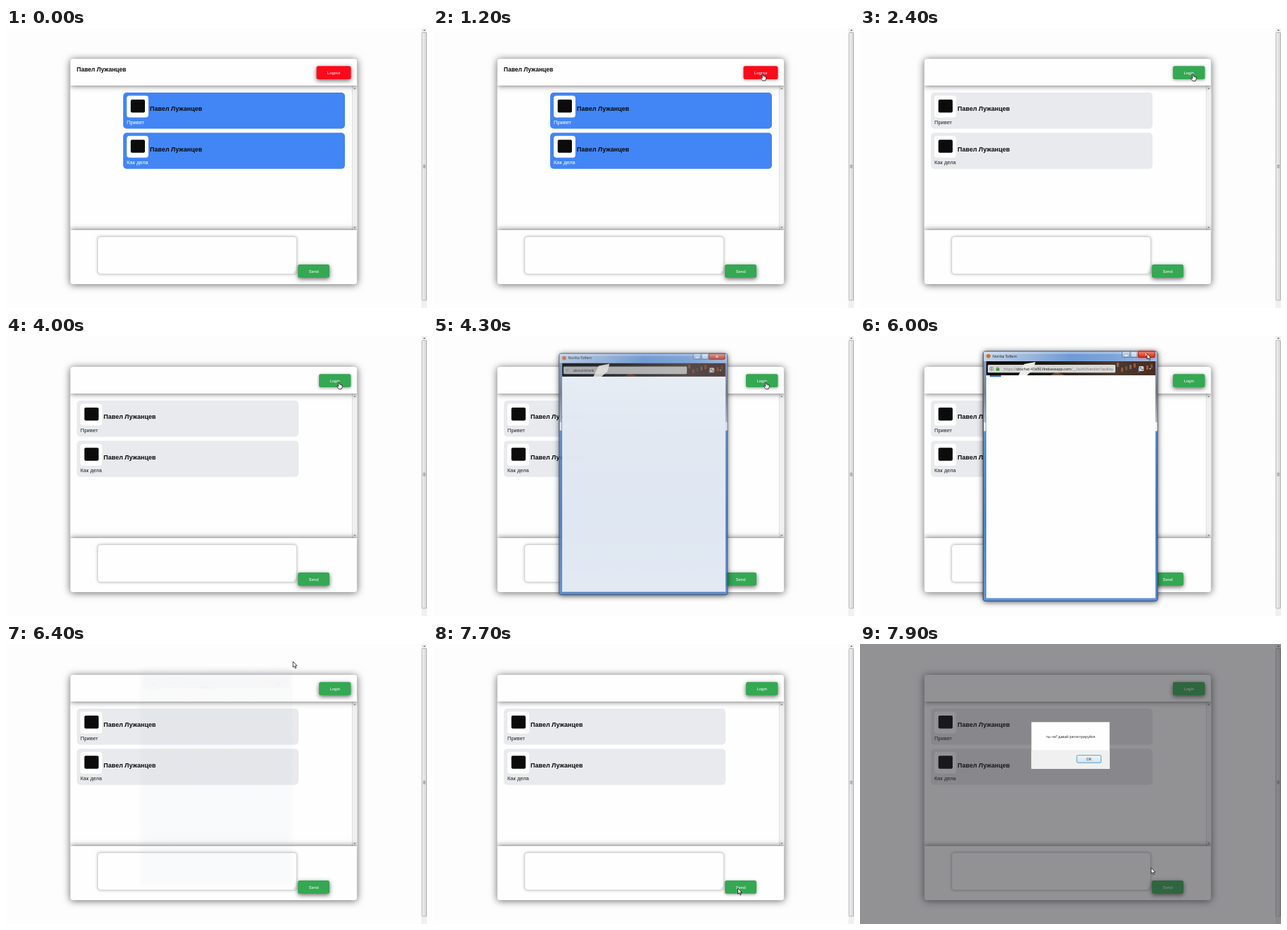
An HTML page with a canvas that plays this animation: 600x399 px, repeating every 8 s.

```html
<!DOCTYPE html>
<html lang="ru">
<head>
<meta charset="utf-8">
<title>Chat</title>
<style>
html, body { margin: 0; width: 100%; height: 100%; overflow: hidden; background: #fdfdfe; }
canvas { display: block; width: 600px; height: 399px; }
</style>
</head>
<body>
<canvas id="stage"></canvas>
<script>
const LOOP = 8000;
const USER = 'Павел Лужанцев';
const ARIAL = '"Liberation Sans", Arial, sans-serif';
const UI = '"Open Sans", "Noto Sans", sans-serif';
const GREEN = '#34a853';

const canvas = document.getElementById('stage');
const ctx = canvas.getContext('2d');
const dpr = window.devicePixelRatio || 1;
canvas.width = 600 * dpr;
canvas.height = 399 * dpr;

const clamp = v => Math.max(0, Math.min(1, v));
const span = (t, a, b) => clamp((t - a) / (b - a));
const smooth = p => p * p * (3 - 2 * p);
const easeOut = p => 1 - (1 - p) * (1 - p);

function rect(x, y, w, h, fill) {
  ctx.fillStyle = fill;
  ctx.fillRect(x, y, w, h);
}

// Rounded box with optional shadow [blur, dy, colour]
function box(x, y, w, h, r, fill, shadow, stroke) {
  ctx.save();
  ctx.beginPath();
  ctx.roundRect(x, y, w, h, r);
  if (shadow) {
    ctx.shadowBlur = shadow[0] * dpr;
    ctx.shadowOffsetY = shadow[1] * dpr;
    ctx.shadowColor = shadow[2];
  }
  ctx.fillStyle = fill;
  ctx.fill();
  ctx.shadowColor = 'transparent';
  if (stroke) {
    ctx.strokeStyle = stroke;
    ctx.lineWidth = 0.8;
    ctx.stroke();
  }
  ctx.restore();
}

function text(s, x, y, font, fill, align = 'left') {
  ctx.font = font;
  ctx.fillStyle = fill;
  ctx.textAlign = align;
  ctx.fillText(s, x, y);
  return ctx.measureText(s).width;
}

function poly(points, fill, stroke, width = 0.7) {
  ctx.beginPath();
  points.forEach(([x, y]) => ctx.lineTo(x, y));
  ctx.closePath();
  if (fill) { ctx.fillStyle = fill; ctx.fill(); }
  if (stroke) {
    ctx.strokeStyle = stroke;
    ctx.lineWidth = width;
    ctx.stroke();
  }
}

function dot(x, y, r, fill) {
  ctx.beginPath();
  ctx.arc(x, y, r, 0, Math.PI * 2);
  ctx.fillStyle = fill;
  ctx.fill();
}

function gradient(x0, y0, x1, y1, ...colors) {
  const g = ctx.createLinearGradient(x0, y0, x1, y1);
  colors.forEach((c, i) => g.addColorStop(i / (colors.length - 1), c));
  return g;
}

function button(label, x, y, w, h, fill, hover) {
  box(x, y, w, h, 2.5, fill, hover ? [4, 1, 'rgba(0,0,0,.4)'] : [6, 2, 'rgba(0,0,0,.6)']);
  text(label, x + w / 2, y + h / 2 + 2.2, '6px ' + ARIAL, '#fff', 'center');
}

function message(x, y, body, own) {
  box(x, y, 316, 51.5, 5, own ? '#4285f4' : '#e8eaed');
  box(x + 5, y + 4.5, 31, 31, 4, '#fff');
  box(x + 10.7, y + 10, 20.3, 18.5, 2, '#0b0b0b');
  text(USER, x + 38, y + 26.3, 'bold 9px ' + ARIAL, '#0a0a0a');
  text(body, x + 5, y + 45, '7.5px ' + ARIAL, own ? '#fff' : '#222');
}

function pageScrollbar() {
  rect(592, 0, 8, 399, '#f0f0f1');
  box(592.8, 6.5, 6.8, 381.5, 1, gradient(592, 0, 600, 0, '#f6f6f6', '#e4e4e6', '#cfcfd2'), null, '#a9a9ad');
  poly([[594.5, 4], [596.3, 2], [598, 4]], '#666');
  for (let i = 0; i < 3; i++) rect(594.3, 195 + i * 1.8, 3.6, 0.8, '#777');
}

function chat(loggedIn, hoverTop, hoverSend) {
  rect(0, 0, 600, 399, '#fdfdfe');
  pageScrollbar();
  box(91.5, 44, 409, 321, 4, '#fefefe', [11, 1, 'rgba(0,0,0,.6)']);

  ctx.save();
  ctx.beginPath();
  ctx.roundRect(91.5, 44, 409, 321, 4);
  ctx.clip();
  const x = loggedIn ? 167 : 101;
  message(x, 92, 'Привет', loggedIn);
  message(x, 149.3, 'Как дела', loggedIn);

  rect(493.5, 82, 7, 206, '#f1f1f2');
  rect(493.2, 82, 0.6, 206, '#cfcfd2');
  poly([[495.5, 87], [497, 85.2], [498.5, 87]], '#777');
  poly([[495.5, 283.5], [497, 285.3], [498.5, 283.5]], '#777');

  const edge = [8, 0, 'rgba(0,0,0,.65)'];
  box(91.5, 40, 409, 42, 0, '#fefefe', edge);
  box(91.5, 288, 409, 82, 0, '#fefefe', edge);
  ctx.restore();

  if (loggedIn) {
    text(USER, 100.8, 62, 'bold 8.5px ' + ARIAL, '#0a0a0a');
    button('Logout', 442.5, 54.3, 49, 18.7, '#fb0a1a', hoverTop);
  } else {
    button('Login', 446, 54.3, 45.5, 18.7, GREEN, hoverTop);
  }

  box(130.7, 297.3, 283.6, 53.5, 4, '#fefefe', [4, 0, 'rgba(0,0,0,.3)'], '#c9c9cc');
  for (let i = 0; i < 2; i++) {
    ctx.beginPath();
    ctx.moveTo(409.5 + i * 2, 349.5);
    ctx.lineTo(413, 346 + i * 2);
    ctx.strokeStyle = '#aaa';
    ctx.lineWidth = 0.5;
    ctx.stroke();
  }
  button('Send', 416, 337, 45, 18.7, GREEN, hoverSend);
}

function toolbar(loaded) {
  ctx.save();
  ctx.beginPath();
  ctx.rect(180, 36, 241, 20);
  ctx.clip();
  rect(180, 36, 241, 20, gradient(180, 0, 421, 0, '#0a0a0c', '#15120f', '#2c2620', '#4a3a30', '#4a2c20'));
  poly([[226, 56], [234, 40], [250, 37], [247, 48], [238, 56]], '#f0eeea');
  poly([[272, 56], [280, 51], [292, 56]], '#6b4a3a');
  for (let i = 0; i < 9; i++) {
    rect(366 + i * 6, 38 + (i * 7) % 9, 3, 6, ['#83695b', '#a1543a', '#5e5a58'][i % 3]);
  }
  ctx.restore();

  box(182, 41, 182, 11.3, 1.5, loaded ? 'rgba(236,236,236,.9)' : 'rgba(226,226,226,.86)');
  const font = '5.3px ' + UI;
  if (loaded) {
    ctx.beginPath();
    ctx.arc(187.5, 46.6, 2.4, 0, Math.PI * 2);
    ctx.strokeStyle = '#666';
    ctx.lineWidth = 0.6;
    ctx.stroke();
    rect(187.1, 45.2, 0.8, 3, '#666');
    box(194, 46, 4.6, 3.4, 0.5, '#2f9e3a');
    ctx.beginPath();
    ctx.arc(196.3, 46, 1.5, Math.PI, 0);
    ctx.strokeStyle = '#2f9e3a';
    ctx.lineWidth = 0.8;
    ctx.stroke();
    ctx.save();
    ctx.beginPath();
    ctx.rect(200, 40, 162, 13);
    ctx.clip();
    let x = 204.5;
    x += text('https://', x, 48.6, font, '#777');
    x += text('cbschat-41e50.firebaseapp.com', x, 48.6, font, '#111');
    text('/__/auth/handler?apiKey', x, 48.6, font, '#777');
    ctx.restore();
  } else {
    dot(187.5, 46.6, 2, 'rgba(120,120,120,.35)');
    text('about:blank', 196.3, 48.6, '5.6px ' + UI, '#222');
  }
  box(397.5, 43, 6.5, 7, 1, '#cfd3d8');
  rect(399, 44.5, 2, 2, '#3b78c8');
  rect(401.3, 46.8, 2, 2, '#c8452f');
  poly([[412, 46], [415, 46], [413.5, 47.8]], '#ddd');
}

function popup(loaded, hoverClose, bar) {
  box(175.5, 21.8, 248.5, 356, 3, gradient(0, 22, 0, 378, '#8fb0dc', '#5d8dd0', '#4a80cc', '#5f92d8'),
    [9, 1, 'rgba(0,0,0,.75)'], '#24395c');
  rect(176.3, 22.6, 247, 13.4, gradient(176, 0, 424, 0, '#c3d2e6', '#9db8dc', '#6f9ad6', '#7da4d9', '#a9c0e0'));
  rect(176.3, 22.6, 247, 3, 'rgba(255,255,255,.3)');
  for (const x of [176.5, 421]) {
    rect(x, 36, 2.7, 87, gradient(0, 36, 0, 123, '#8298b8', '#75797f', '#b9bcc2'));
    rect(x, 123, 2.7, 12.5, '#f4f5f8');
  }
  dot(183, 28.6, 2.9, '#d9682a');
  text('Norilta Tolfern', 189, 30.6, '5.2px ' + UI, '#1a1a1a');

  const glass = gradient(0, 22, 0, 31, '#d3e0f0', '#8fabd2');
  box(373.5, 22, 11.5, 8.5, 1, glass, null, '#5b7296');
  box(385, 22, 11.5, 8.5, 1, glass, null, '#5b7296');
  box(396.5, 22, 23.5, 8.5, 1,
    hoverClose ? gradient(0, 22, 0, 31, '#f08a78', '#d8200c') : gradient(0, 22, 0, 31, '#e0998c', '#b93a24'),
    hoverClose ? [4, 0, 'rgba(255,40,20,.9)'] : null, '#6a2a22');
  rect(377, 27, 4.5, 1.4, '#fff');
  ctx.strokeStyle = '#fff';
  ctx.lineWidth = 0.9;
  ctx.strokeRect(388.8, 24.6, 4, 3.5);
  text('×', 408.3, 29.2, 'bold 7px ' + ARIAL, '#fff', 'center');

  toolbar(loaded);
  rect(180, 56, 241, 317.5, '#fefefe');
  if (bar > 0) rect(185, 56, 16 * bar, 2.3, '#3f6fc4');
}

function drawPopup(t) {
  if (t < 4150 || t > 6420) return;
  const shown = easeOut(span(t, 4150, 4450)) * (1 - smooth(span(t, 6130, 6420)));
  const scale = 1 - 0.136 * (1 - shown);
  ctx.save();
  // Fade the window as one layer
  if (shown < 1) ctx.globalAlpha = Math.min(1, shown * 1.1);
  ctx.translate(299.7, 199.7 - 12 * (1 - shown));
  ctx.scale(scale, scale);
  ctx.translate(-299.7, -199.7);
  popup(t >= 5480, t >= 5680 && t < 6400, span(t, 5880, 5990));
  ctx.restore();
}

function drawAlert() {
  rect(0, 0, 600, 399, 'rgba(40,39,44,.5)');
  rect(244.3, 111.3, 111.4, 66.7, '#fefefe');
  rect(244.3, 151.3, 111.4, 26.7, '#f0f0f0');
  text('ты че? давай регистрируйся', 300.3, 133.6, '5.1px ' + UI, '#222', 'center');
  box(309, 158.6, 34.5, 10.6, 1.5, gradient(0, 158, 0, 169, '#f3f7fa', '#d3e4f0'), null, '#2f8fc8');
  text('OK', 326.3, 166, '5.5px ' + UI, '#222', 'center');
}

// Pointer stops: time, x, y
const PATH = [
  [500, 438, 335], [1000, 470, 65], [1800, 470, 65], [2000, 474.5, 65.5],
  [4480, 474.5, 65.5], [4980, 441.7, 42], [5120, 441.7, 42], [5700, 409, 25],
  [6450, 409, 25], [7300, 434.5, 348], [7720, 434.5, 348], [7900, 415, 319]
];

function pointer(t) {
  let i = 0;
  while (i < PATH.length - 2 && t > PATH[i + 1][0]) i++;
  const [t0, x0, y0] = PATH[i], [t1, x1, y1] = PATH[i + 1];
  const p = smooth(span(t, t0, t1));
  return [x0 + (x1 - x0) * p, y0 + (y1 - y0) * p];
}

const ARROW = [[0, 0], [0, 8.2], [1.9, 6.5], [3.2, 9.7], [4.6, 9.1], [3.3, 6.1], [5.8, 6]];
const HAND = [[-0.8, 0.3], [0.6, 0.3], [0.8, 3.3], [4.6, 4.4], [4.7, 7.2], [3.7, 10], [-0.4, 10], [-3, 6.3], [-2.2, 5.5], [-0.8, 6.6]];

function drawPointer(x, y, shape) {
  poly(shape.map(([a, b]) => [x + a, y + b]), '#fff', '#111', 0.8);
}

function draw(t) {
  ctx.setTransform(dpr, 0, 0, dpr, 0, 0);
  const loggedIn = t < 1280;
  const visible = t >= 480;
  const [x, y] = pointer(t);
  const over = (l, r, a, b) => visible && x > l && x < r && y > a && y < b;
  const onTop = over(loggedIn ? 442 : 446, 491, 54, 73);
  const alertOpen = t >= 7760;
  chat(loggedIn, onTop, over(416, 461, 337, 356) && !alertOpen);
  drawPopup(t);
  if (alertOpen) drawAlert();
  if (visible) drawPointer(x, y, onTop ? HAND : ARROW);
}

let start = null;
function tick(now) {
  if (start === null) start = now;
  draw((now - start) % LOOP);
  requestAnimationFrame(tick);
}
draw(0);
requestAnimationFrame(tick);
</script>
</body>
</html>
```
